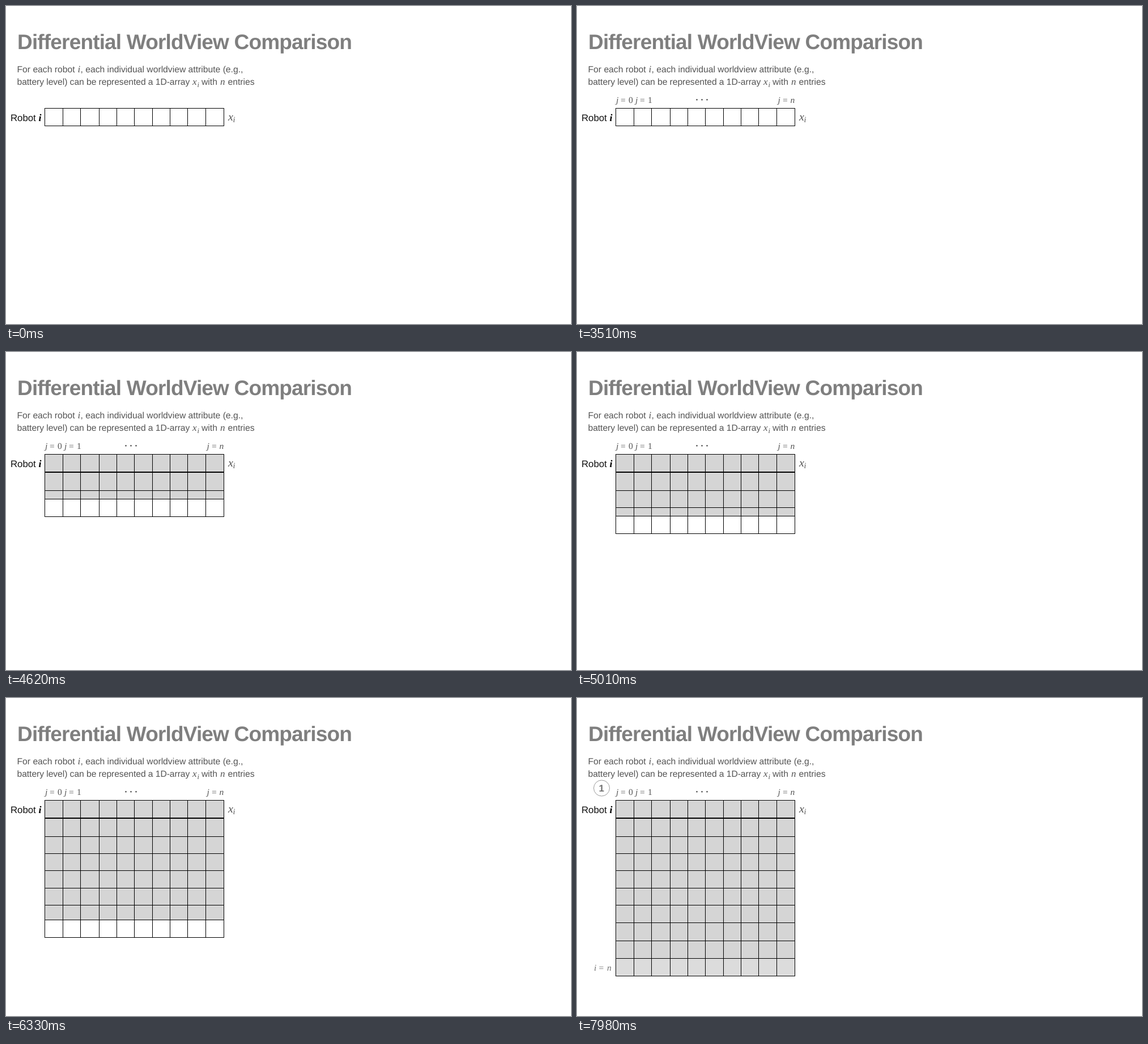
An HTML page for the animation above (8 s loop, 997 px wide and 561 px high).

```html
<!DOCTYPE html>
<html lang="en">
<head>
<meta charset="utf-8">
<title>Worldview comparison</title>
<style>
  html, body { margin: 0; width: 100%; height: 100%; overflow: hidden; background: #fff; }
  svg { display: block; }
  text {
    font: 15.7px "Liberation Sans", Arial, sans-serif;
    fill: #545454; white-space: pre; text-rendering: geometricPrecision;
  }
  .title { font-size: 37px; font-weight: bold; letter-spacing: -.83px; fill: #7f7f7f; }
  .tight { letter-spacing: -.07px; }
  .label { font-size: 16.8px; fill: #111; }
  .math, .num { font: 17px "Liberation Serif", Times, serif; }
  .math { font-style: italic; }
  .index .math, .index .num { font-size: 15.5px; }
  .sub { font-size: 12.5px; }
  .big { font-size: 20px; }
  .bigsub { font-size: 14px; }
  .row { font-size: 18px; font-weight: bold; fill: #000; }
  .badge { font-size: 17px; font-weight: bold; text-anchor: middle; }
  .line { fill: none; stroke: #000; shape-rendering: crispEdges; }
  .cells { fill: #d5d5d5; shape-rendering: crispEdges; }
</style>
</head>
<body>
<svg id="stage" width="997" height="561" viewBox="0 0 997 561">
  <defs><clipPath id="reveal"><rect id="window" x="60" y="181" width="340" height="0"/></clipPath></defs>
</svg>
<script>
const stage = document.getElementById('stage');
const revealed = document.getElementById('window');
const LOOP = 8000, TICK = 30;
const LEFT = 68, RIGHT = 384, TOP = 180, CELL = 31;
const columns = [LEFT, 100, 131, 164, 195, 226, 258, 289, 320, 352, RIGHT];

function add(parent, tag, attrs = {}, text = '') {
  const el = document.createElementNS('http://www.w3.org/2000/svg', tag);
  for (const key in attrs) el.setAttribute(key, attrs[key]);
  el.textContent = text;
  parent.append(el);
  return el;
}

const group = (parent = stage, attrs) => add(parent, 'g', attrs);

// Each piece of text: x, baseline, string, optional class.
function write(parent, pieces) {
  for (const [x, y, text, cls = ''] of pieces) add(parent, 'text', { x, y, class: cls }, text);
}

const verticals = (y1, y2) => columns.map(x => `M${x + .5} ${y1}V${y2}`).join('');
const horizontals = ys => ys.map(y => `M${LEFT} ${y + .5}H${RIGHT + 1}`).join('');

function emptyRow(parent) {
  const box = { x: LEFT, y: 0, width: RIGHT - LEFT + 1, height: CELL + 1 };
  add(parent, 'rect', { ...box, fill: '#fff' });
  const tint = add(parent, 'rect', { ...box, class: 'cells', opacity: 0 });
  add(parent, 'path', { d: verticals(0, CELL + 1) + horizontals([0, CELL]), class: 'line' });
  return tint;
}

function arrow(parent, x1, y1, x2, y2) {
  const angle = Math.atan2(y2 - y1, x2 - x1) * 180 / Math.PI;
  add(parent, 'path', { d: `M${x1} ${y1}L${x2} ${y2}`, stroke: '#000', 'stroke-width': 1.1 });
  add(parent, 'path', { d: 'M1 0L-5.5 -2.7V2.7Z', transform: `translate(${x2} ${y2}) rotate(${angle})` });
}

// Fixed text
write(stage, [
  [20, 75.7, 'Differential WorldView Comparison', 'title'],
  [19.5, 117, 'For each robot'],
  [126.5, 117, 'i', 'math'],
  [131.5, 117, ', each individual worldview attribute (e.g.,'],
  [19.5, 139, 'battery level) can be represented a 1D-array', 'tight'],
  [329, 139, 'x', 'math'],
  [337.5, 142.5, 'i', 'math sub'],
  [345, 139, 'with'],
  [378, 139, 'n', 'math'],
  [391.5, 139, 'entries'],
  [8, 202.5, 'Robot', 'label'],
  [57.5, 202.5, 'i', 'math row'],
  [392, 201.5, 'x', 'math big'],
  [400.5, 205, 'i', 'math bigsub']
]);

// Filled table, uncovered from the top by the moving row
const table = group(stage, { 'clip-path': 'url(#reveal)' });
add(table, 'rect', { x: LEFT, y: TOP, width: RIGHT - LEFT + 1, height: 311, class: 'cells' });
add(table, 'path', {
  d: verticals(TOP, 491) + horizontals([211, 212, 244, 274, 304, 335, 365, 396, 428, 459, 490]),
  class: 'line'
});
add(stage, 'path', { d: horizontals([TOP]), class: 'line' });

const mover = group();
const tint = emptyRow(mover);

// Column labels
const heads = group(stage, { class: 'index' });
write(heads, [
  [69, 171, 'j', 'math'], [77, 171, '=', 'num'], [91, 171, '0', 'num'],
  [103, 171, 'j', 'math'], [111, 171, '=', 'num'], [125, 171, '1', 'num'],
  [354.5, 171, 'j', 'math'], [363, 171, '=', 'num'], [376.5, 171, 'n', 'math']
]);
for (const cx of [211.5, 220.5, 229.5]) add(heads, 'circle', { cx, cy: 165.3, r: 1.4, fill: '#5e5e5e' });

// Example cell with its explanation
const example = group();
add(example, 'rect', { x: 101.5, y: 180.5, width: 30, height: 31, fill: '#ffe066', stroke: '#dcba40' });
arrow(example, 184, 250.7, 117.3, 198.7);
write(example, [
  [177.5, 274.3, 'What robot'],
  [259.5, 274.3, 'i', 'math'],
  [269, 274.3, 'thinks about'],
  [213.5, 293.7, 'Robot 1’s state']
]);

const note = group();
arrow(note, 96.3, 250, 114, 198.5);
write(note, [
  [17, 277.5, 'j', 'math'],
  [22.5, 277.5, '-th entry represents'],
  [15.5, 300, 'robot’s'],
  [68.5, 300, 'i', 'math'],
  [78, 300, 'belief about'],
  [17, 322.5, 'the state of robot'],
  [142.5, 322.5, 'j', 'math'],
  [147, 322.5, '’s'],
  [58.5, 342, 'attribute']
]);

// Step badge and last row label
const finish = group();
add(finish, 'circle', { cx: 43.5, cy: 159, r: 14, fill: '#fff', stroke: '#858585' });
write(finish, [[43.2, 165, '1', 'badge']]);
write(group(finish, { class: 'index' }), [
  [30, 480.5, 'i', 'math'], [38.5, 480.5, '=', 'num'], [53, 480.5, 'n', 'math']
]);

// Moves of the row: start, end, from, to
const moves = [
  [3600, 4410, 180, 243.5],
  [4410, 5220, 243.5, 305.8],
  [5220, 6030, 305.8, 368],
  [6030, 6840, 368, 431],
  [6840, 7260, 431, 459]
];

const ramp = (t, start, end) => Math.min(1, Math.max(0, (t - start) / (end - start)));
const fade = (el, value) => el.setAttribute('opacity', value);

function draw(t) {
  let y = TOP;
  for (const [start, end, from, to] of moves) {
    if (t >= start) y = Math.floor(from + (to - from) * ramp(t, start, end));
  }
  mover.setAttribute('transform', `translate(0 ${y})`);
  revealed.setAttribute('height', Math.max(0, y - TOP - 1));

  const leave = 1 - ramp(t, 2730, 3510);
  const settle = ramp(t, 7440, 8090);
  fade(heads, ramp(t, 150, 840));
  fade(note, ramp(t, 150, 840) * leave);
  fade(example, ramp(t, 990, 1770) * leave);
  fade(finish, settle);
  fade(tint, settle);
}

const origin = performance.now();
function tick() {
  const t = (performance.now() - origin) % LOOP;
  draw(Math.floor(t / TICK) * TICK);
  requestAnimationFrame(tick);
}
tick();
</script>
</body>
</html>
```
